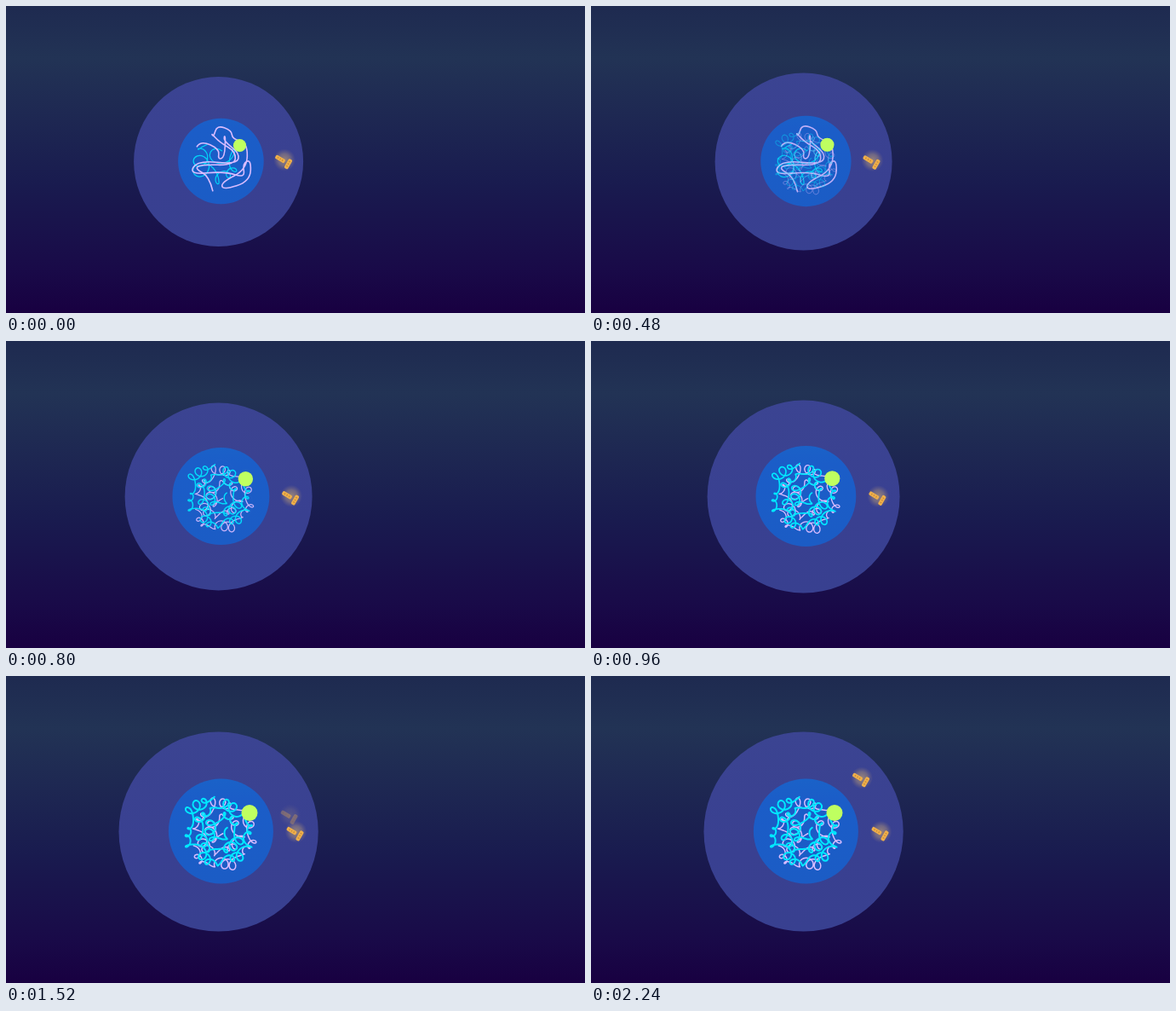
An HTML page with a canvas for the animation above (2.56 s loop, 680 by 360 pixels).

```html
<!DOCTYPE html>
<html lang="en">
<head>
<meta charset="utf-8">
<title>Cell growth</title>
<style>
html, body { margin: 0; width: 100%; height: 100%; overflow: hidden; background: #190a48; }
canvas { display: block; }
</style>
</head>
<body>
<canvas id="stage" width="680" height="360"></canvas>
<script>
const ctx = document.getElementById('stage').getContext('2d');
const TAU = Math.PI * 2;
const LOOP = 2560, STEP = 80;
const GROW = [240, 1180], SPLIT = [1200, 2240];
const LILAC = '#d9bcff', CYAN = '#00e8ff';

const clamp = v => Math.max(0, Math.min(1, v));
const lerp = (a, b, p) => a + (b - a) * p;
const phase = (t, [a, b]) => clamp((t - a) / (b - a));

// A spiral of even spacing with uneven curls along it, as offsets from the centre
function tangle({ reach, turns, curls, size, start }) {
  const pts = [], count = curls * 12;
  for (let i = 0; i <= count; i++) {
    const u = i / count;
    const s = Math.sqrt(1 - u * .97);
    const wave = Math.sin(TAU * curls * .37 * u + start);
    const r = reach * s * (1 + .07 * wave);
    const a = start + TAU * turns * s;
    const curl = TAU * curls * u + 1.8 * wave;
    const c = size * (.8 + .35 * Math.sin(TAU * curls * .23 * u + start * 2));
    pts.push([
      r * Math.cos(a) + c * Math.cos(curl),
      r * Math.sin(a) + c * Math.sin(curl)
    ]);
  }
  return pts;
}

const tightCyan = tangle({ reach: 42, turns: 3.3, curls: 31, size: 6, start: 2.6 });
const tightLilac = tangle({ reach: 42, turns: 2.7, curls: 27, size: 6, start: 4.4 });
const looseCyan = tangle({ reach: 28, turns: 1.3, curls: 7, size: 10, start: 2.2 });
const looseLilac = [
  [-10, 35], [-14, 18], [-31, 9], [-24, 4], [16, 5], [17, -11], [-2, -22], [-12, -33],
  [-9, -28], [-5, -42], [12, -36], [13, -26], [31, -21], [30, 10], [0, 25], [2, 34],
  [34, 24], [35, -2], [25, 3], [28, 20], [4, 12], [-38, 16], [-28, -1], [18, 4],
  [22, -9], [2, -24], [5, -32], [4, -4], [-4, -2], [-2, -14], [-24, -24], [-33, -10]
];

function gradient(y0, y1, stops) {
  const g = ctx.createLinearGradient(0, y0, 0, y1);
  for (const [at, color] of stops) g.addColorStop(at, color);
  return g;
}

const sky = gradient(0, 360, [
  [0, '#1e2a50'], [.17, '#223355'], [.58, '#191b4f'], [.86, '#190a48'], [1, '#180041']
]);
const bodyFill = gradient(65, 300, [[0, '#3b4492'], [.6, '#394091'], [1, '#384090']]);
const coreFill = gradient(120, 244, [[0, '#1a62c8'], [.2, '#1b5dc8'], [1, '#1b5cc5']]);

function disc(x, y, r, fill) {
  ctx.fillStyle = fill;
  ctx.beginPath();
  ctx.arc(x, y, r, 0, TAU);
  ctx.fill();
}

// Smooth line through the midpoints
function strand(pts, scale, color, width, alpha) {
  if (alpha <= 0) return;
  ctx.save();
  ctx.translate(252.8, 181.8);
  ctx.globalAlpha = alpha;
  ctx.strokeStyle = color;
  ctx.lineWidth = width;
  ctx.lineCap = ctx.lineJoin = 'round';
  ctx.beginPath();
  const scaled = pts.map(([x, y]) => [x * scale, y * scale]);
  ctx.moveTo(...scaled[0]);
  for (let i = 1; i < scaled.length - 1; i++) {
    const [x, y] = scaled[i], [nx, ny] = scaled[i + 1];
    ctx.quadraticCurveTo(x, y, (x + nx) / 2, (y + ny) / 2);
  }
  ctx.stroke();
  ctx.restore();
}

function barrel(x, y, angle) {
  ctx.save();
  ctx.translate(x, y);
  ctx.rotate(angle);
  ctx.fillStyle = '#f0b04a';
  ctx.beginPath();
  ctx.roundRect(-6.2, -2.4, 12.4, 4.8, 1.6);
  ctx.fill();
  ctx.fillStyle = 'rgba(150, 95, 45, .45)';
  for (let i = -1; i < 2; i++) ctx.fillRect(i * 3 - .5, -1, 1.2, 2);
  ctx.restore();
}

function centrosome(x, y, alpha) {
  ctx.save();
  ctx.globalAlpha = alpha;
  ctx.translate(x, y);
  const glow = ctx.createRadialGradient(1, -1.5, 0, 1, -1.5, 13);
  glow.addColorStop(0, 'rgba(215, 175, 105, .6)');
  glow.addColorStop(.55, 'rgba(185, 155, 115, .42)');
  glow.addColorStop(1, 'rgba(150, 125, 120, 0)');
  disc(1, -1.5, 13, glow);
  barrel(-4, -2.6, .54);
  barrel(5.5, 3.2, -1.05);
  ctx.restore();
}

function chromatin(p) {
  const loose = lerp(1, 1.1, p), fade = 1 - clamp((p - .2) / .4);
  strand(looseCyan, loose, CYAN, 1.2, .85 * fade);
  strand(looseLilac, loose, LILAC, 1.6, fade);

  const tight = lerp(.81, 1, p), show = clamp(p / .65);
  strand(tightLilac, tight, LILAC, lerp(.8, 1.5, p), show);
  strand(tightCyan, tight, CYAN, lerp(.7, 2, p), show);
}

function draw(t) {
  const p = phase(t, GROW), q = phase(t, SPLIT);
  ctx.fillStyle = sky;
  ctx.fillRect(0, 0, 680, 360);

  disc(249.6, 182.5, lerp(99.5, 117.1, p), bodyFill);
  disc(252.4, 182, lerp(50.3, 61.5, p), coreFill);
  chromatin(p);
  disc(lerp(274.5, 286, p), lerp(163.5, 160.5, p), lerp(7.6, 9.5, p), '#bfff60');

  const x = lerp(326, 339.5, p), y = lerp(182, 184.2, p);
  if (q > 0) centrosome(lerp(x, 317, q), lerp(y, 121, q), q);
  centrosome(x, y, 1);
}

function tick() {
  const t = performance.now() % LOOP;
  draw(Math.floor(t / STEP) * STEP);
  requestAnimationFrame(tick);
}
tick();
</script>
</body>
</html>
```
